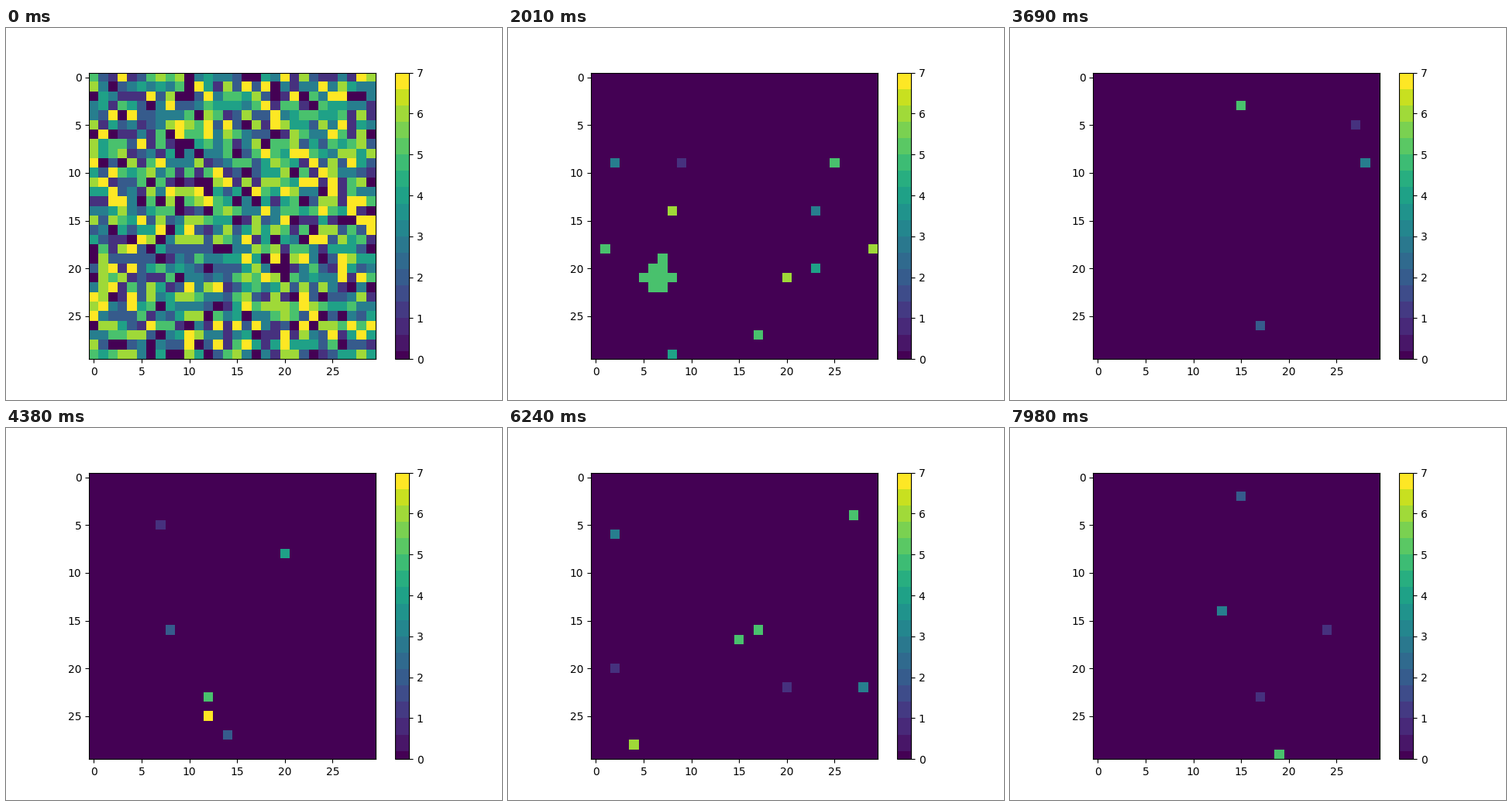
Recreate the animation shown at these times as a matplotlib script. Size 640x480 px, loop 8 s.

```python
import numpy as np
import matplotlib.pyplot as plt
from matplotlib.animation import FuncAnimation

SIZE, STATES = 30, 8
STEP_MS, TICK_MS, LOOP_MS = 30, 20, 8000
STEPS = -(-LOOP_MS // STEP_MS)
SETTLED, DRIFTED, GONE = 29, 67, 77     # steps at which the domains change phase
NOISE = 0.0085

rng = np.random.default_rng(8)
rows, cols = np.indices((SIZE, SIZE))


def diamond(row, col, radius):
    """Mask of a diamond on the wrapped grid, slightly taller than wide."""
    dr, dc = (np.abs((axis - centre + SIZE / 2) % SIZE - SIZE / 2)
              for axis, centre in ((rows, row), (cols, col)))
    return 0.9 * dr + dc <= radius


def settled_scene():
    """A striped kite in the middle and small diamonds around the edges."""
    scene = np.zeros((SIZE, SIZE), int)
    slope = np.maximum(1.1 * (rows - 13), 2.5 * (13 - rows))
    kite = np.abs(cols - 21.5) + slope <= 5.5
    scene[kite] = 4
    scene[kite & (cols + rows < 35)] = 3
    scene[kite & (cols + rows / 2 >= 30)] = 6
    scene[diamond(27.2, 1, 2.7)] = 4
    scene[diamond(26.6, -1, 1.2)] = 1
    scene[diamond(13.4, -1.4, 1)] = 2
    scene[diamond(12, 0, 1.05)] = 5
    return scene


def one_hot(grid):
    return (grid == np.arange(STATES)[:, None, None]).astype(float)


def majority(grid, pull):
    """Most common state of the eight neighbours; ties go to the lowest."""
    hot = one_hot(grid)
    score = pull - hot
    for dr in (-1, 0, 1):
        for dc in (-1, 0, 1):
            score = score + np.roll(hot, (dr, dc), axis=(1, 2))
    return score.argmax(axis=0)


def add_drifter(grid, step):
    """A small diamond wanders away, grows a little and dies out."""
    if SETTLED <= step < GONE:
        row = np.interp(step, [SETTLED, DRIFTED], [12, 20.8])
        col = np.interp(step, [SETTLED, DRIFTED], [0, 6.7])
        radius = np.interp(step, [SETTLED, DRIFTED, GONE], [1.05, 1.95, 0])
        grid[diamond(row, col, radius)] = 5


def add_sparks(grid):
    hit = rng.random(grid.shape) < NOISE
    grid[hit] = rng.integers(1, STATES, hit.sum())


def simulate():
    scene = settled_scene()
    goal = one_hot(scene) * (1 + (scene > 0))
    empty = one_hot(np.zeros_like(scene))
    grid = rng.integers(0, STATES, scene.shape)
    shown = [grid]
    for step in range(1, STEPS):
        if step <= SETTLED:
            pull = goal * (0.3 + 8.7 * (step / SETTLED) ** 3)
        else:
            pull = empty * max(0, (step - 45) / 8)
        grid = majority(grid, pull)
        view = grid.copy()
        add_drifter(view, step)
        add_sparks(view)
        shown.append(view)
    return shown


grids = simulate()

fig, ax = plt.subplots(figsize=(6.4, 4.8), dpi=100)
scale = dict(cmap="viridis", vmin=0, vmax=STATES - 1)
image = ax.imshow(grids[0], **scale)
bar = fig.colorbar(image, ax=ax)

# stepped colour scale with short end bands
edges = np.r_[0, np.arange(0.2, 6.7, 0.4), 7]
mids = (edges[:-1] + edges[1:]) / 2
mids[[0, -1]] = 0, 7
bar.solids.set_visible(False)
bar.ax.pcolormesh([0, 1], edges, mids[:, None], **scale)
bar.ax.set(xlim=(0, 1), ylim=(0, 7))


def draw(frame):
    step = (frame * TICK_MS + TICK_MS // 2) // STEP_MS
    image.set_data(grids[step])
    return [image]


anim = FuncAnimation(fig, draw, frames=LOOP_MS // TICK_MS, interval=TICK_MS,
                     repeat=True)
plt.show()
```
